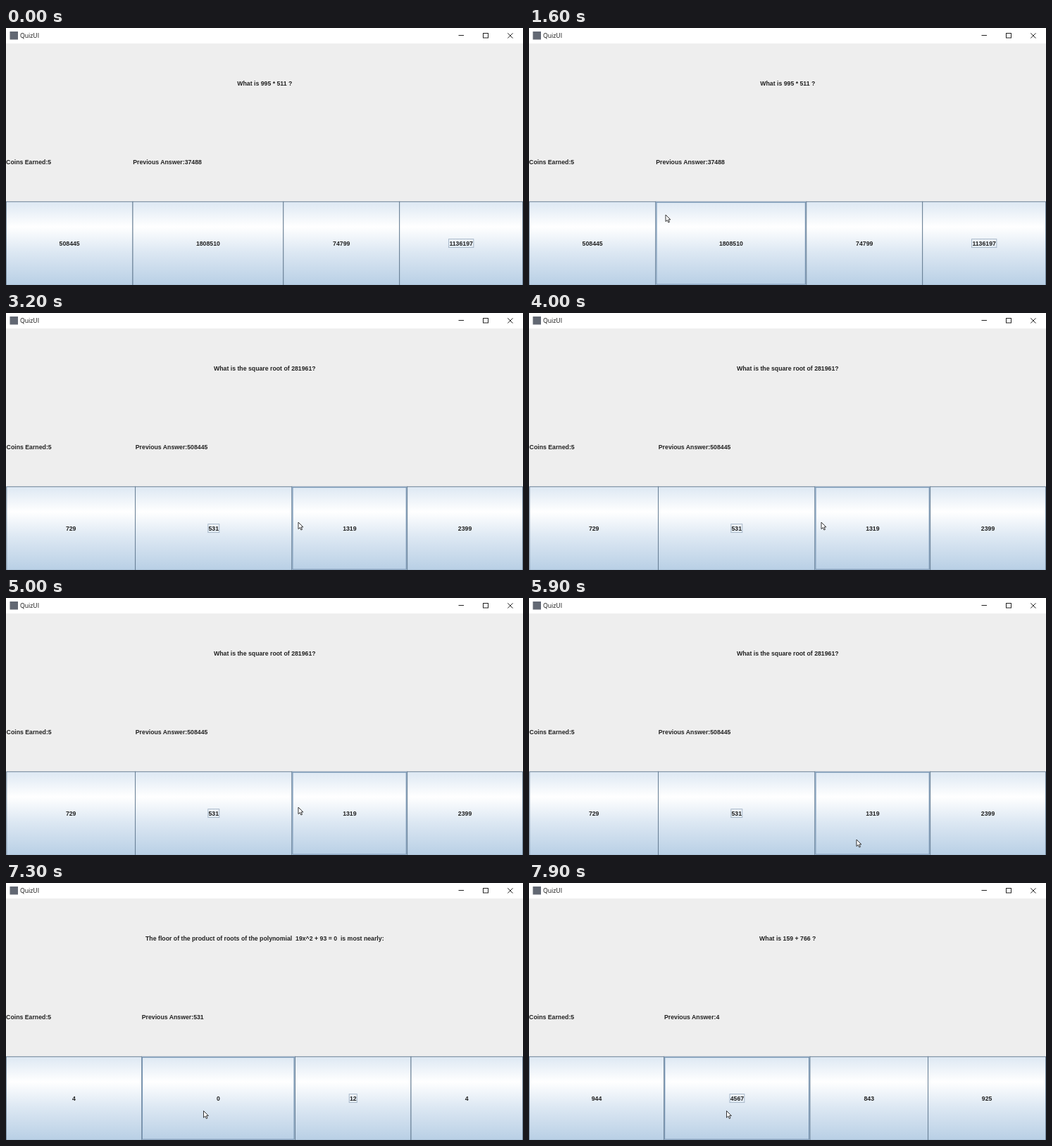
Recreate the animation shown at these times as an HTML page. Size 734 by 366 pixels, loop 8 s.

```html
<!DOCTYPE html>
<html lang="en">
<head>
<meta charset="utf-8">
<title>QuizUI</title>
<style>
html, body { margin: 0; width: 100%; height: 100%; overflow: hidden; background: #eee; }
svg { display: block; width: 734px; height: 366px; }
text { font: bold 8.74px "Liberation Sans", Arial, sans-serif; fill: #222; white-space: pre; }
.mid { text-anchor: middle; }
.title { font: 8.7px "Open Sans", sans-serif; fill: #111; }
</style>
</head>
<body>
<svg viewBox="0 0 734 366" xmlns="http://www.w3.org/2000/svg">
  <defs>
    <linearGradient id="steel" x1="0" y1="0" x2="0" y2="1">
      <stop offset="0" stop-color="#dde8f3"/>
      <stop offset=".3" stop-color="#fff"/>
      <stop offset=".6" stop-color="#dde8f3"/>
      <stop offset="1" stop-color="#b8cfe5"/>
    </linearGradient>
  </defs>
  <rect width="734" height="366" fill="#eee"/>
  <rect width="734" height="22" fill="#fff"/>
  <rect x="5.5" y="5" width="11.5" height="11.5" fill="#626873"/>
  <text class="title" x="20" y="14">QuizUI</text>
  <g fill="none" stroke="#222" stroke-width="1">
    <path d="M642.5 10.5h7.5"/>
    <rect x="677.5" y="7.5" width="7" height="6.5"/>
    <path d="M712.3 7.3l7.2 7.2m0-7.2l-7.2 7.2"/>
  </g>
  <text class="mid" id="ask" x="367.3" y="81.7"/>
  <text id="coins" y="193.7">Coins Earned:5</text>
  <text id="prev" y="193.7"/>
  <g id="buttons"></g>
  <path id="cursor" d="M0 0V9.6L2.3 7.5L3.9 11L5.5 10.3L3.9 6.9H6.9Z" fill="#fff" stroke="#222" stroke-width=".9" stroke-linejoin="round"/>
</svg>
<script>
const LOOP = 8000, TICK = 100, TOP = 247.3, HEIGHT = 119;
const $ = id => document.getElementById(id);

const scenes = [
  { at: 0, ask: "What is 995 * 511 ?", prev: 37488, focus: 3,
    edges: [0.3, 180, 393.8, 558.7, 733.6], options: [508445, 1808510, 74799, 1136197] },
  { at: 2500, ask: "What is the square root of 281961?", prev: 508445, focus: 1,
    edges: [0.8, 183.6, 406, 569.7, 733.4], options: [729, 531, 1319, 2399] },
  { at: 6200, ask: "The floor of the product of roots of the polynomial  19x^2 + 93 = 0  is most nearly:",
    prev: 531, focus: 2,
    edges: [0.3, 192.5, 410.5, 575, 733.6], options: [4, 0, 12, 4] },
  { at: 7400, ask: "What is 159 + 766 ?", prev: 4, focus: 1,
    edges: [0.3, 191.8, 399, 566.6, 733.6], options: [944, 4567, 843, 925] }
];

// time, x, y of the pointer tip
const path = [
  [700, -12, 120], [1000, 118, 196], [1300, 118, 196], [1600, 194, 266],
  [1800, 194, 266], [2250, 323, 326], [2750, 323, 326], [3050, 415, 298],
  [5000, 415, 298], [5600, 465, 344], [6800, 465, 344], [7250, 280.5, 324.5]
];

function pointer(t) {
  if (t < path[0][0]) return [-20, 120];
  const i = path.findIndex(p => p[0] > t);
  if (i < 0) return path[path.length - 1].slice(1);
  const [t0, x0, y0] = path[i - 1], [t1, x1, y1] = path[i];
  const u = (t - t0) / (t1 - t0), k = u * u * (3 - 2 * u);
  return [x0 + (x1 - x0) * k, y0 + (y1 - y0) * k];
}

const box = (x, y, w, h, stroke, fill = "none", width = 1) =>
  `<rect x="${x}" y="${y}" width="${w}" height="${h}" fill="${fill}" stroke="${stroke}" stroke-width="${width}"/>`;

function button(scene, i, hover) {
  const x = scene.edges[i], w = scene.edges[i + 1] - x, mid = x + w / 2;
  const label = String(scene.options[i]);
  let out = box(x, TOP, w, HEIGHT, "#60788f", "url(#steel)", 0.9);
  if (hover) {
    out += box(x + 1, TOP + 1, w - 2, HEIGHT - 2, "#c3d6e9", "none", 1.6);
    out += box(x + 0.9, TOP + 0.9, w - 2.4, HEIGHT - 2.1, "#6f8dab");
  }
  if (scene.focus === i) {
    const tw = label.length * 4.86 + 1.4;
    out += box(mid - tw / 2, 300.6, tw, 12, "#a3b4c6", "none", 0.9);
  }
  return out + `<text class="mid" x="${mid}" y="310">${label}</text>`;
}

let shown = "";
function draw(t) {
  const scene = scenes.filter(s => s.at <= t).pop();
  const [x, y] = pointer(t);
  const hover = y < TOP ? -1 : scene.options.findIndex((_, i) => x >= scene.edges[i] && x < scene.edges[i + 1]);
  const key = scene.at + "/" + hover;
  if (key !== shown) {
    shown = key;
    $("ask").textContent = scene.ask;
    $("prev").textContent = "Previous Answer:" + scene.prev;
    $("prev").setAttribute("x", scene.edges[1] + 0.2);
    $("coins").setAttribute("x", scene.edges[0] - 0.2);
    $("buttons").innerHTML = scene.options.map((_, i) => button(scene, i, i === hover)).join("");
  }
  $("cursor").setAttribute("transform", `translate(${x} ${y})`);
}

const start = performance.now();
function frame() {
  const t = (performance.now() - start) % LOOP;
  draw(Math.floor(t / TICK) * TICK);
  requestAnimationFrame(frame);
}
frame();
</script>
</body>
</html>
```
